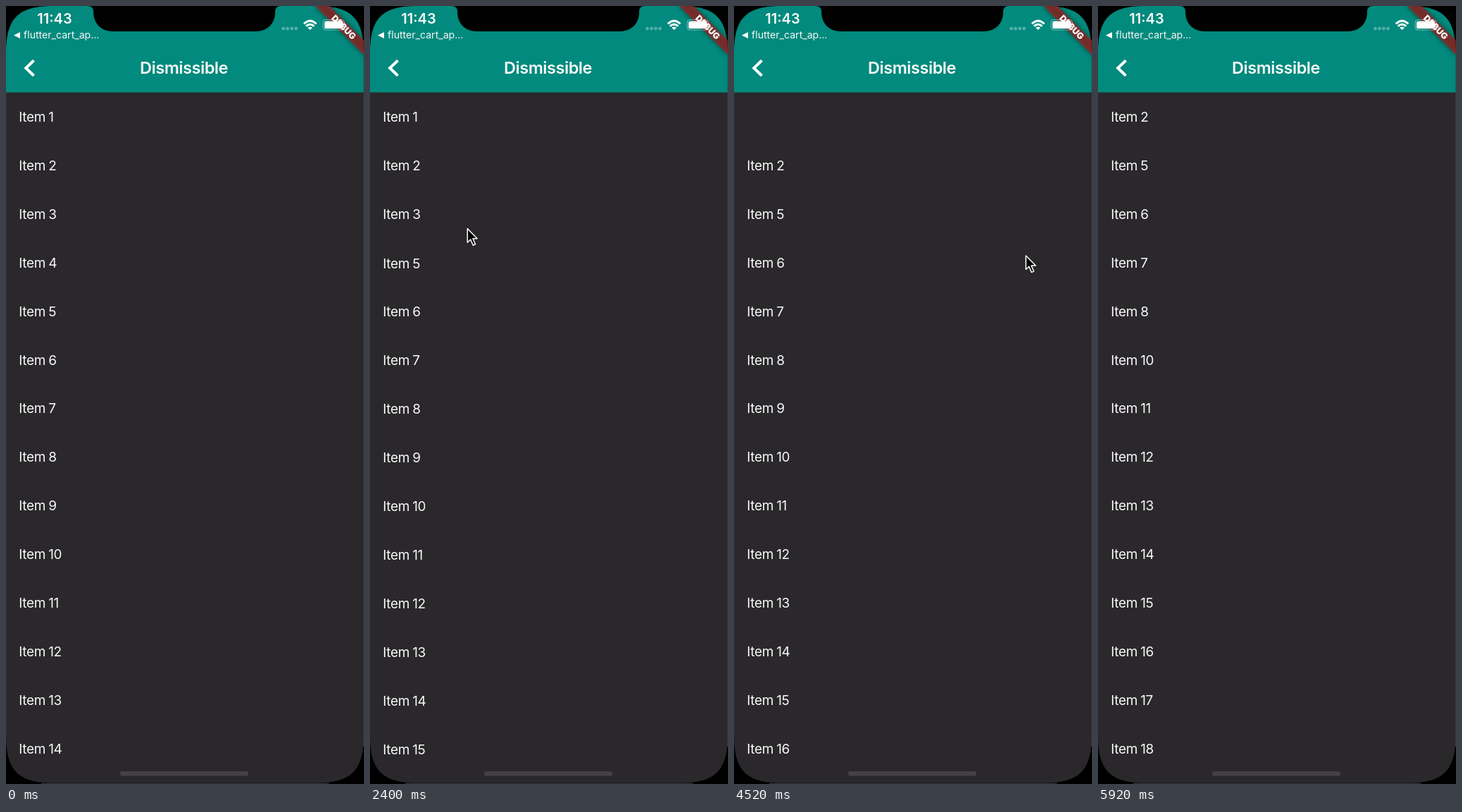
An HTML page for the animation above (6440 ms loop, 508x1103 px).

```html
<!DOCTYPE html>
<html lang="en">
<head>
<meta charset="utf-8">
<title>Dismissible</title>
<style>
  html, body { margin: 0; width: 100%; height: 100%; overflow: hidden; background: #000; }
  svg { display: block; width: 508px; height: 1103px; }
  text { font-family: Inter, "Noto Sans", sans-serif; fill: #f8f8f8; }
  #list text { font-size: 19px; letter-spacing: -0.33px; word-spacing: -1px; }
</style>
</head>
<body>
<svg viewBox="0 0 508 1103" xmlns="http://www.w3.org/2000/svg">
  <defs>
    <clipPath id="screen">
      <path d="M68 0H439.5C490 0 507.5 17 507.5 68V1033.5C507.5 1084 490 1101.5 439.5 1101.5H68C17 1101.5 0 1084 0 1033.5V68C0 17 17 0 68 0Z"/>
    </clipPath>
    <clipPath id="corner"><rect width="508" height="122"/></clipPath>
    <filter id="blur" x="-30%" y="-100%" width="160%" height="300%">
      <feGaussianBlur stdDeviation="3.5"/>
    </filter>
  </defs>
  <rect width="508" height="1103" fill="#000"/>
  <path d="M507.5 60V1050M50 1102.3H458" stroke="#454749" stroke-width="1"/>

  <g clip-path="url(#screen)">
    <rect width="508" height="1103" fill="#2a282b"/>
    <g id="list"></g>
    <rect width="508" height="122.5" fill="#018a7d"/>
    <path d="M39.5 77.3L28.2 88L39.5 98.7" fill="none" stroke="#fff" stroke-width="4"/>
    <text x="252.5" y="96.3" text-anchor="middle" font-size="23.4" font-weight="600" letter-spacing="-0.4">Dismissible</text>
    <rect x="162" y="1085" width="182" height="6.5" rx="3.2" fill="#434145"/>
  </g>

  <g clip-path="url(#corner)">
    <g transform="translate(508 0) rotate(45)">
      <rect x="-49" y="34.4" width="98" height="14.7" fill="#000" opacity=".5" filter="url(#blur)"/>
      <rect x="-49" y="34.4" width="98" height="14.7" fill="#b71c1c" opacity=".627"/>
      <text x="1" y="46" text-anchor="middle" font-size="12.4" font-weight="900">DEBUG</text>
    </g>
  </g>

  <path d="M116 0Q124 0 124 8C124 25 135 36 152 36H354C371 36 382 25 382 8Q382 0 390 0Z" fill="#000"/>
  <text x="69" y="25.4" text-anchor="middle" font-size="20" font-weight="600">11:43</text>
  <path d="M11 41.5L20 37V46Z" fill="#fff"/>
  <text x="25" y="46.3" font-size="14.1">flutter_cart_ap...</text>
  <g fill="#fff" opacity=".32">
    <circle cx="393.5" cy="32" r="2.4"/><circle cx="399.5" cy="32" r="2.4"/>
    <circle cx="405.5" cy="32" r="2.4"/><circle cx="411.5" cy="32" r="2.4"/>
  </g>
  <g fill="none" stroke="#fff" stroke-width="2.9">
    <path d="M422.7 25.2Q431.5 16.8 440.3 25.2"/>
    <path d="M425.8 28.6Q431.5 23.4 437.2 28.6"/>
  </g>
  <path d="M431.5 34L428.2 30.8Q431.5 28 434.8 30.8Z" fill="#fff"/>
  <rect x="450" y="19.5" width="30" height="14.5" rx="4.4" fill="none" stroke="#fff" stroke-opacity=".45" stroke-width="1.2"/>
  <rect x="452" y="21.5" width="26" height="10.5" rx="2.6" fill="#fff"/>
  <path d="M481.8 24.3Q484.3 26.7 481.8 29.2Z" fill="#fff" opacity=".5"/>

  <path id="cursor" d="M.4 .7V20.3L4.8 16.1L8.4 24.3L11.6 22.9L8.1 14.8H14.2Z" fill="#000" stroke="#fff" stroke-width="1.5" stroke-linejoin="round"/>
</svg>
<script>
const LOOP = 6440, STEP = 40, ROW = 68.92, TOP = 122.5, COUNT = 19;
const COLLAPSE = 180;

// The pointer appears, travels to the row and rests; the row is flung at `fling`, its gap closes at `fold`.
const swipes = [
  { item: 4, dir: -1, from: [290, 1027], to: [422, 374], appear: 40, rest: 1080, fling: 1840, fold: 2247 },
  { item: 3, dir: 1, from: [118, 351], to: [224, 287], appear: 2280, rest: 2920, fling: 2920, fold: 3290 },
  { item: 1, dir: 1, from: [400, 286], to: [306, 148], appear: 3480, rest: 3840, fling: 4040, fold: 4555 },
  { item: 9, dir: -1, from: [424, 170], to: [363, 524], appear: 4480, rest: 4720, fling: 5000, fold: 5505 }
];

const list = document.getElementById("list");
const cursor = document.getElementById("cursor");
const rows = Array.from({ length: COUNT }, (_, i) => {
  const row = document.createElementNS("http://www.w3.org/2000/svg", "text");
  row.textContent = "Item " + (i + 1);
  return list.appendChild(row);
});

const clamp = v => Math.min(1, Math.max(0, v));
const mix = (a, b, p) => a + (b - a) * p;

// cubic-bezier(.25, .1, .25, 1)
function ease(x) {
  if (x >= 1) return 1;
  let lo = 0, hi = 1;
  for (let i = 0; i < 24; i++) {
    const s = (lo + hi) / 2;
    if (.75 * s - .75 * s * s + s * s * s < x) lo = s; else hi = s;
  }
  const r = 1 - lo;
  return .3 * lo * r * r + 3 * lo * lo * r + lo * lo * lo;
}

// accelerating slide that leaves the screen after three steps
const slide = (s, t) => s.dir * 30 * Math.max(0, (t - s.fling) / STEP) ** 2.6;

function drawRows(t) {
  let y = TOP;
  rows.forEach((row, i) => {
    const swipe = swipes.find(s => s.item === i + 1);
    const x = swipe ? slide(swipe, t) : 0;
    const away = Math.abs(x) > 505;
    row.setAttribute("transform", `translate(${18.3 + (away ? 0 : x)} ${y + 41.4})`);
    row.setAttribute("visibility", away ? "hidden" : "visible");
    y += swipe ? ROW * (1 - ease(clamp((t - swipe.fold) / COLLAPSE))) : ROW;
  });
}

function drawCursor(t) {
  const s = swipes.find(s => t >= s.appear && t <= s.fling);
  cursor.setAttribute("visibility", s ? "visible" : "hidden");
  if (!s) return;
  const p = clamp((t - s.appear) / (s.rest - s.appear));
  const x = mix(s.from[0], s.to[0], p);
  const y = mix(s.from[1], s.to[1], 1 - (1 - p) ** 4);
  cursor.setAttribute("transform", `translate(${x} ${y})`);
}

function draw(t) {
  drawRows(t);
  drawCursor(t);
}

const start = performance.now();
function tick() {
  const t = (performance.now() - start) % LOOP;
  draw(Math.floor(t / STEP) * STEP);
  requestAnimationFrame(tick);
}
draw(0);
requestAnimationFrame(tick);
</script>
</body>
</html>
```
